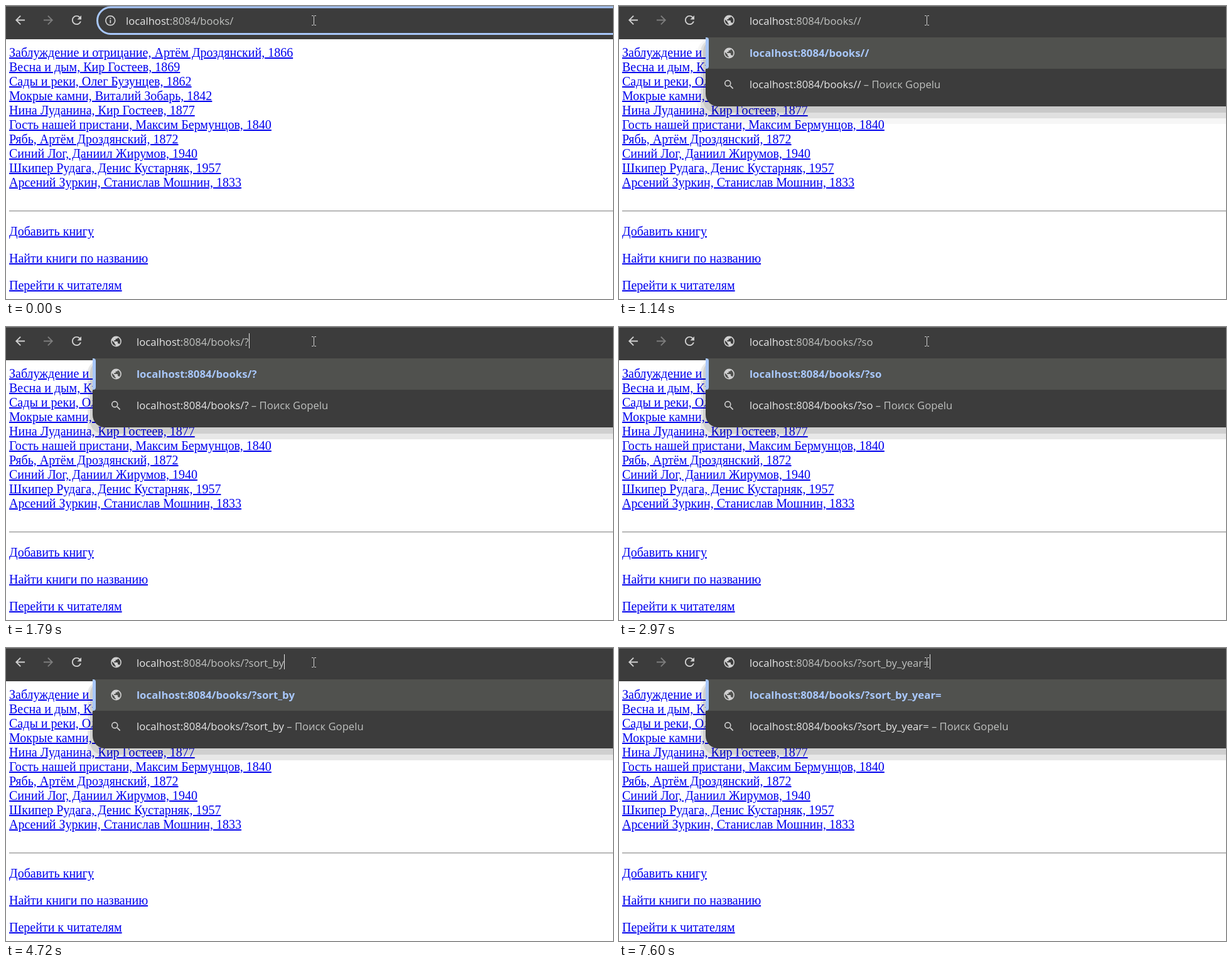
Animation of 967 by 467 pixels, one loop 8000 ms. Source, as an HTML page:

```html
<!DOCTYPE html>
<html lang="ru">
<head>
<meta charset="utf-8">
<title>Книги</title>
<style>
  html, body { margin: 0; width: 100%; height: 100%; overflow: hidden; background: #fff; }
  svg { display: block; }
  text { white-space: pre; }
  .link { font: 20px "Liberation Serif", "Times New Roman", serif; fill: #0000ee; text-decoration: underline; }
  .ui { font: 16.65px "Open Sans", "Noto Sans", sans-serif; fill: #e6e6e6; }
  .dim { fill: #c0c2c0; }
  .url { fill: #a8c7fa; }
  .match { fill: #a8c7fa; font-weight: 700; font-size: 16.8px; }
</style>
</head>
<body>
<svg id="stage" width="967" height="467" viewBox="0 0 967 467"></svg>
<script>
const NS = "http://www.w3.org/2000/svg";
const stage = document.getElementById("stage");
const LOOP = 8000;
const HOST = "localhost";
const PATH = ":8084/books";
const BAR = "#3c3c3c";
const ICON = "#d0d0d0";

const icons = {
  arrow: "M20 11H7.83l5.59-5.59L12 4l-8 8 8 8 1.41-1.41L7.83 13H20z",
  reload: "M17.65 6.35C16.2 4.9 14.21 4 12 4c-4.42 0-7.99 3.58-7.99 8s3.57 8 7.99 8c3.73 0 6.84-2.55 7.73-6h-2.08c-.82 2.33-3.04 4-5.65 4-3.31 0-6-2.69-6-6s2.69-6 6-6c1.66 0 3.14.69 4.22 1.78L13 11h7V4z",
  globe: "M12 2a10 10 0 1 0 0 20 10 10 0 0 0 0-20zm-1 17.93c-3.95-.49-7-3.85-7-7.93 0-.62.08-1.21.21-1.79L9 15v1c0 1.1.9 2 2 2zm6.9-2.54c-.26-.81-1-1.39-1.9-1.39h-1v-3c0-.55-.45-1-1-1H8v-2h2c.55 0 1-.45 1-1V7h2c1.1 0 2-.9 2-2v-.41c2.93 1.19 5 4.06 5 7.41 0 2.08-.8 3.97-2.1 5.39z",
  search: "M15.5 14h-.79l-.28-.27A6.47 6.47 0 0 0 16 9.5 6.5 6.5 0 1 0 9.5 16c1.61 0 3.09-.59 4.23-1.57l.27.28v.79l5 4.99L20.49 19zm-6 0a4.5 4.5 0 1 1 0-9 4.5 4.5 0 0 1 0 9z"
};

const books = [
  "Заблуждение и отрицание, Артём Дроздянский, 1866",
  "Весна и дым, Кир Гостеев, 1869",
  "Сады и реки, Олег Бузунцев, 1862",
  "Мокрые камни, Виталий Зобарь, 1842",
  "Нина Луданина, Кир Гостеев, 1877",
  "Гость нашей пристани, Максим Бермунцов, 1840",
  "Рябь, Артём Дроздянский, 1872",
  "Синий Лог, Даниил Жирумов, 1940",
  "Шкипер Рудага, Денис Кустарняк, 1957",
  "Арсений Зуркин, Станислав Мошнин, 1833"
];
const actions = ["Добавить книгу", "Найти книги по названию", "Перейти к читателям"];

// start time, typed ending, caret x
const typing = [
  [0, "/", 364],
  [580, "//", 386],
  [1420, "/", 379],
  [1790, "/?", 387],
  [2320, "/?s", 395],
  [2440, "/?so", 405],
  [3250, "/?sort", 416],
  [3820, "/?sort_", 424],
  [4190, "/?sort_b", 434],
  [4720, "/?sort_by", 443],
  [5280, "/?sort_by_", 450],
  [6070, "/?sort_by_y", 459],
  [6500, "/?sort_by_ye", 467],
  [6890, "/?sort_by_year", 483],
  [7600, "/?sort_by_year=", 495]
];
const caretOff = [[0, 290], [1140, 1420], [2970, 3250], [5810, 6070], [7450, 7600]];

function add(parent, tag, attrs, content) {
  const el = document.createElementNS(NS, tag);
  for (const key in attrs) el.setAttribute(key, attrs[key]);
  if (content !== undefined) el.textContent = content;
  parent.appendChild(el);
  return el;
}

const rect = (parent, x, y, width, height, fill, more) =>
  add(parent, "rect", { x, y, width, height, fill, ...more });

function icon(parent, name, cx, cy, scale, fill = ICON, flip = 1) {
  return add(parent, "path", {
    d: icons[name], fill, "fill-rule": "evenodd",
    transform: `translate(${cx} ${cy}) scale(${scale * flip} ${scale}) translate(-12 -12)`
  });
}

// parts: [text, class, optional x]
function line(parent, x, y, parts) {
  const el = add(parent, "text", { x, y, class: "ui" });
  return parts.map(([text, cls, at]) =>
    add(el, "tspan", { class: cls, ...(at && { x: at }) }, text));
}

function row(parent, i, name, parts) {
  const y = 75 + 50 * i;
  if (name === "search") icon(parent, name, 175.3, y + 0.2, 0.82);
  else icon(parent, name, 175.5, y, 0.84);
  return line(parent, 208, y + 6, parts);
}

function drawPage() {
  const link = (text, y) => add(stage, "text", { x: 5, y, class: "link" }, text);
  books.forEach((text, i) => link(text, 81 + 23 * i));
  rect(stage, 5, 326, 962, 1, "#8f8f8f");
  rect(stage, 5, 327, 962, 1, "#e4e4e4");
  actions.forEach((text, i) => link(text, 366 + 43 * i));
}

function drawToolbar() {
  rect(stage, 0, 0, 967, 53, BAR);
  rect(stage, 0, 0, 967, 1, "#6c6c6c");
  icon(stage, "arrow", 22.5, 22.5, 0.94);
  icon(stage, "arrow", 67.5, 22.5, 0.94, "#7d7d7d", -1);
  icon(stage, "reload", 112.5, 22.5, 0.94);
}

function drawIdleBar() {
  const g = add(stage, "g", {});
  rect(g, 145.5, 2, 860, 42.5, BAR, { rx: 21.2, stroke: "#a8c7fa", "stroke-width": 3 });
  add(g, "circle", { cx: 166.3, cy: 23.3, r: 7.4, fill: "none", stroke: ICON, "stroke-width": 1.7 });
  rect(g, 165.4, 22.3, 1.8, 5, ICON);
  rect(g, 165.4, 18.8, 1.8, 1.9, ICON);
  line(g, 191, 30, [[HOST], [PATH + "/", "dim"]]);
  return g;
}

function drawPopup() {
  const g = add(stage, "g", {});
  const shades = [[13, 28, 0.035], [8, 19, 0.09], [4, 10, 0.1]].map(([side, drop, opacity]) => ({
    drop,
    el: rect(g, 138 - side, 53, 900, 0, "#000", { rx: 20, opacity })
  }));
  const body = add(g, "path", { fill: BAR });
  rect(g, 138, 50, 829, 50, "#50514e");
  add(g, "path", { d: "M138 50h1a4 4 0 0 1 4 4v42a4 4 0 0 1-4 4h-1z", fill: "#a8c7fa" });
  icon(g, "globe", 175.5, 23, 0.84);
  const input = line(g, 208, 30, [[HOST], ["", "dim"]])[1];

  const typed = add(g, "g", {});
  const direct = row(typed, 0, "globe", [["", "match"]])[0];

  const query = row(g, 1, "search", [[""], [" – Поиск Gopelu", "dim"]])[0];

  const full = add(g, "g", {});
  const base = HOST + PATH + "/";
  const suggest = (i, title, x, tail) =>
    row(full, i, "globe", [[title], [" – ", "dim"], [base, "match", x], [tail, "url"]]);
  suggest(0, "Книги", 273, "");
  suggest(2, "Поиск книг", 317, "search");
  suggest(3, "Поиск книг", 317, "search?");
  suggest(4, "Книга", 272, "24");

  return { g, shades, body, input, typed, direct, query, full };
}

drawPage();
drawToolbar();
const idle = drawIdleBar();
const popup = drawPopup();
const caret = rect(stage, 0, 10, 1, 24, "#e6e6e6");
add(stage, "path", {
  d: "M487 15.5h2.5l1 1 1-1h2.5M490.5 16.5v13M487 30.5h2.5l1-1 1 1h2.5",
  fill: "none", stroke: "#d2d2d2", "stroke-width": 1
});

const show = (el, on) => el.setAttribute("display", on ? "inline" : "none");

function render(t) {
  const [start, ending, x] = typing.filter(step => step[0] <= t).pop();
  const open = start > 0;
  const listed = open && ending === "/";

  show(idle, !open);
  show(popup.g, open);
  show(popup.full, listed);
  show(popup.typed, !listed);

  const bottom = listed ? 310 : 160;
  popup.body.setAttribute("d", `M138 1H967V${bottom}H158a20 20 0 0 1-20-20z`);
  popup.shades.forEach(({ el, drop }) => el.setAttribute("height", bottom + drop - 53));
  show(popup.shades[0].el, t < 1790);

  const address = HOST + PATH + ending;
  popup.input.textContent = PATH + ending;
  popup.direct.textContent = address;
  popup.query.textContent = address;

  caret.setAttribute("x", x);
  show(caret, !caretOff.some(([from, to]) => t >= from && t < to));
}

let origin;
function tick(now) {
  origin ??= now;
  render((now - origin) % LOOP);
  requestAnimationFrame(tick);
}
render(0);
requestAnimationFrame(tick);
</script>
</body>
</html>
```
